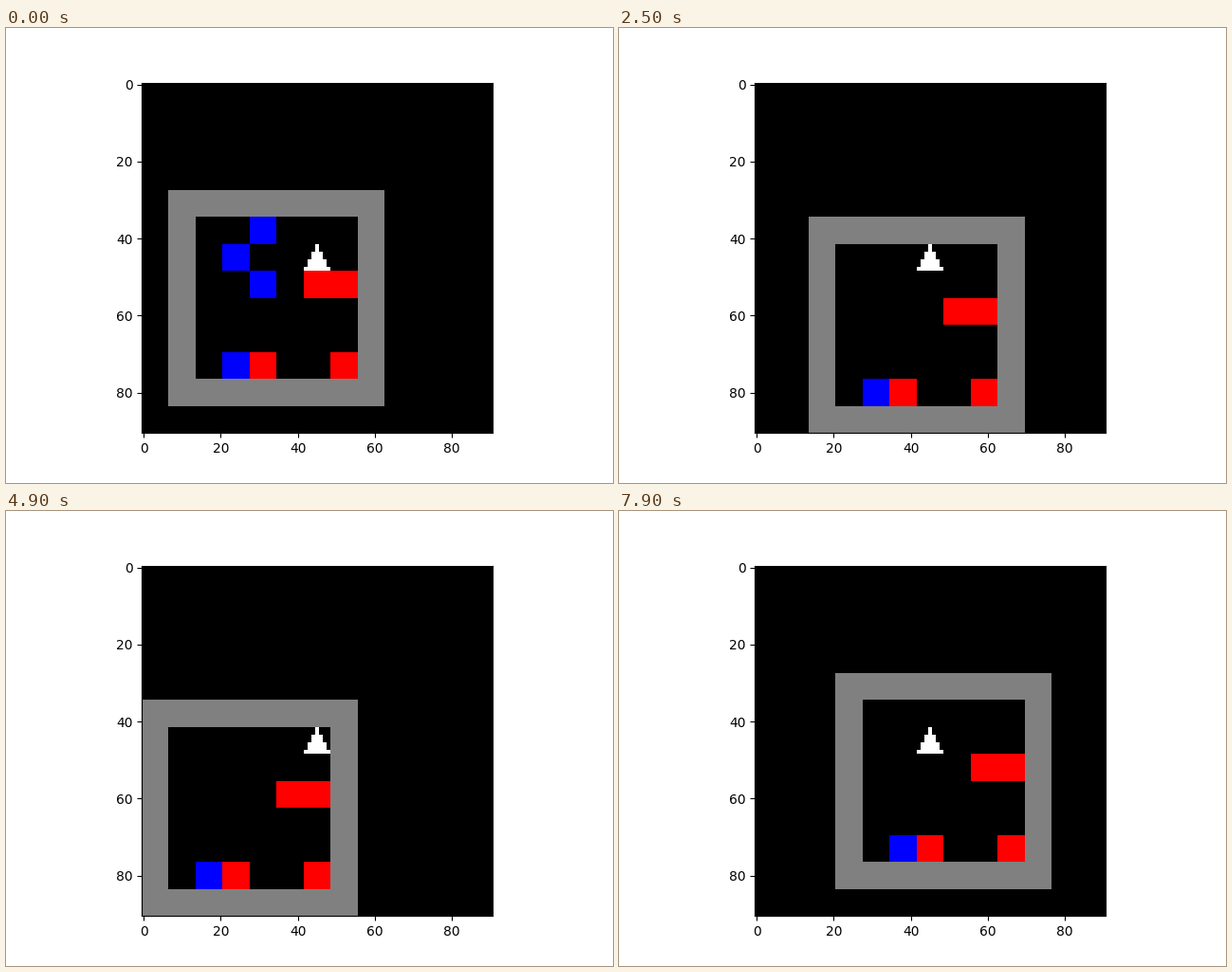
These frames come from a looping animation (640x480 px, 8 s). A matplotlib script:

```python
import matplotlib.pyplot as plt
import numpy as np
from matplotlib.animation import FuncAnimation

CELL = 7      # image pixels per grid cell
VIEW = 13     # cells across the view
ROOM = 8      # cells across the room, walls included
CENTER = VIEW // 2

GRAY, RED, BLUE, WHITE = (128,) * 3, (255, 0, 0), (0, 0, 255), (255,) * 3
REDS = [(5, 3), (6, 3), (3, 6), (6, 6)]
BLUES = [(3, 1), (2, 2), (3, 3), (2, 6)]

STEPS = {"L": (-1, 0), "R": (1, 0), "U": (0, -1), "D": (0, 1), ".": (0, 0)}
START = (5, 2)
# One action per frame; a dot is a move stopped by a wall.
MOVES = (".LLDLUURRR"
         ".LLLDRLRLR"
         "LUR..R..LR"
         "..RL...R.R"
         "D.U.DLLURR"
         ".......D.."
         "U.LLDRLRLR"
         "LLLDRULRLR")


def walk():
    x, y = START
    path = []
    for move in MOVES:
        dx, dy = STEPS[move]
        x, y = x + dx, y + dy
        path.append((x, y))
    return path


PATH = walk()


def fill(image, col, row, color, size=1):
    image[row * CELL:(row + size) * CELL, col * CELL:(col + size) * CELL] = color


def draw_player(image):
    left = top = CENTER * CELL
    middle = left + CELL // 2
    for r in range(CELL):
        half = r // 2
        image[top + r, middle - half:middle + half + 1] = WHITE


def render(frame):
    """The room seen from the player, who stays in the middle of the view."""
    image = np.zeros((VIEW * CELL, VIEW * CELL, 3), dtype=np.uint8)
    px, py = PATH[frame]
    left, top = CENTER - px, CENTER - py
    fill(image, left, top, GRAY, ROOM)
    fill(image, left + 1, top + 1, (0, 0, 0), ROOM - 2)
    visited = set(PATH[:frame + 1])
    for x, y in REDS:
        fill(image, left + x, top + y, RED)
    for x, y in BLUES:
        if (x, y) not in visited:
            fill(image, left + x, top + y, BLUE)
    draw_player(image)
    return image


fig, ax = plt.subplots(figsize=(6.4, 4.8), dpi=100)
picture = ax.imshow(render(0), interpolation="nearest")


def update(frame):
    picture.set_data(render(frame))
    return [picture]


anim = FuncAnimation(fig, update, frames=len(MOVES), interval=100,
                     repeat=True, repeat_delay=0)
plt.show()
```
